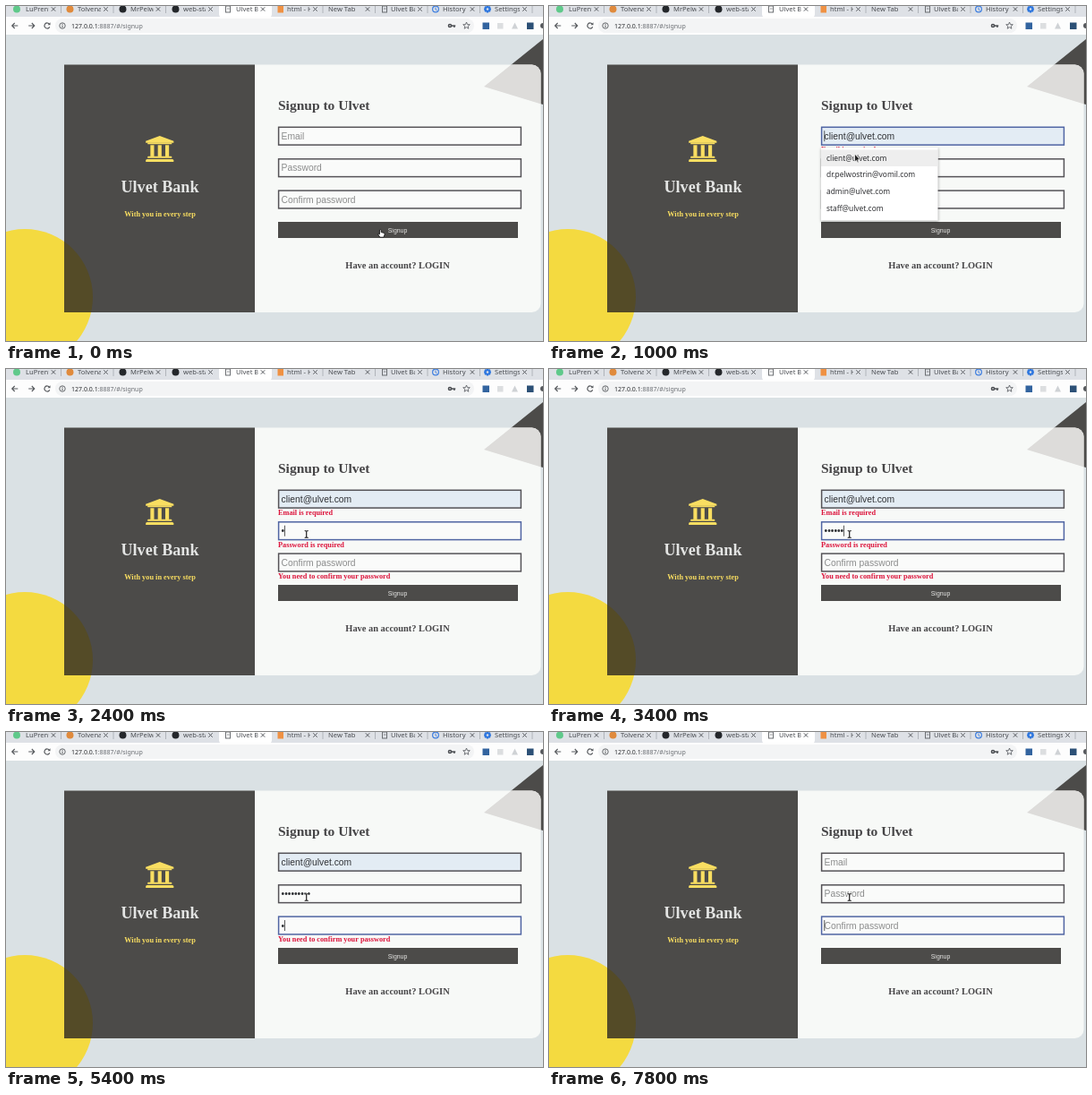
An HTML page with a canvas for the animation above (8000 ms loop, 600 by 374 pixels).

```html
<!DOCTYPE html>
<html lang="en">
<head>
<meta charset="utf-8">
<title>Signup form</title>
<style>
  html, body { margin: 0; width: 100%; height: 100%; overflow: hidden; background: #dae1e4; }
  canvas { display: block; width: 600px; height: 374px; }
</style>
</head>
<body>
<canvas id="stage"></canvas>
<script>
const W = 600, H = 374, LOOP = 8000, STEP = 200;
const SERIF = '"Liberation Serif", "Times New Roman", serif';
const SANS = '"Liberation Sans", Arial, sans-serif';
const UI = '"Noto Sans", "Open Sans", sans-serif';
const DARK = '#4c4b49', INK = '#464547', YELLOW = '#f9de61', RED = '#dc143c';

const canvas = document.getElementById('stage');
const c = canvas.getContext('2d');
const ratio = window.devicePixelRatio || 1;
canvas.width = W * ratio;
canvas.height = H * ratio;

function rect(x, y, w, h, fill) {
  c.fillStyle = fill;
  c.fillRect(x, y, w, h);
}

function round(x, y, w, h, radii, fill) {
  c.beginPath();
  c.roundRect(x, y, w, h, radii);
  c.fillStyle = fill;
  c.fill();
}

function disc(x, y, r, fill) {
  c.beginPath();
  c.arc(x, y, r, 0, Math.PI * 2);
  c.fillStyle = fill;
  c.fill();
}

function poly(points, fill) {
  c.beginPath();
  points.forEach(([x, y]) => c.lineTo(x, y));
  c.closePath();
  c.fillStyle = fill;
  c.fill();
}

function lines(color, width, ...paths) {
  c.strokeStyle = color;
  c.lineWidth = width;
  c.beginPath();
  for (const path of paths) {
    path.forEach(([x, y], i) => i ? c.lineTo(x, y) : c.moveTo(x, y));
  }
  c.stroke();
}

function text(str, x, y, font, fill, align = 'left') {
  c.font = font;
  c.fillStyle = fill;
  c.textAlign = align;
  c.fillText(str, x, y);
}

// Value of the last entry [time, value] already reached
function at(track, t) {
  let value = track[0][1];
  for (const [start, v] of track) if (t >= start) value = v;
  return value;
}

// --- Browser frame ---

function page(x) {
  c.strokeStyle = '#6b6e72';
  c.lineWidth = 1;
  c.strokeRect(x - 2.5, 0, 5, 7);
  lines('#6b6e72', 0.8, [[x - 1, 3], [x + 1.5, 3]]);
}

function clock(x) {
  c.beginPath();
  c.arc(x, 3.5, 3.4, 0, 7);
  c.strokeStyle = '#3f7fe0';
  c.lineWidth = 1.2;
  c.stroke();
  lines('#3f7fe0', 0.9, [[x, 1.5], [x, 4], [x + 1.6, 5]]);
}

function gear(x) {
  c.save();
  c.translate(x, 3.5);
  for (let i = 0; i < 4; i++) {
    rect(-1.1, -4, 2.2, 8, '#2f77df');
    c.rotate(Math.PI / 4);
  }
  c.restore();
  disc(x, 3.5, 3, '#2f77df');
  disc(x, 3.5, 1.2, '#dee1e6');
}

const tabs = [
  ['LuPrent', 22, () => disc(12, 3.5, 4, '#5fc98a')],
  ['Tolvena', 80, () => disc(71.5, 3.5, 4, '#e08a3c')],
  ['MrPelwo', 139, () => disc(130.5, 3.5, 4, '#24272b')],
  ['web-star', 198, () => disc(189.5, 3.5, 4, '#24272b')],
  ['Ulvet Bank', 257, () => page(248)],
  ['html - How', 314, () => rect(303.5, 0, 6.5, 7.5, '#ef9143')],
  ['New Tab', 360, null],
  ['Ulvet Bank', 430, () => page(423)],
  ['History', 488, () => clock(480)],
  ['Settings', 546, () => gear(538)]
];

function drawTabs() {
  rect(0, 0, W, 13, '#dee1e6');
  round(238, -8, 59, 22, 5, '#fff');
  tabs.forEach(([label, x, icon], i) => {
    const close = 53 + 58.5 * i;
    if (icon) icon();
    c.save();
    c.beginPath();
    c.rect(x, 0, close - 5.5 - x, 12);
    c.clip();
    text(label, x, 6.4, '7.6px ' + UI, '#484b50');
    c.restore();
    lines('#55585d', 1, [[close - 2.2, 1.3], [close + 2.2, 5.7]], [[close + 2.2, 1.3], [close - 2.2, 5.7]]);
    if (i !== 3 && i !== 4) lines('#a5a9af', 0.8, [[close + 8.5, 0], [close + 8.5, 8]]);
  });
}

function arrow(x, dir, color) {
  lines(color, 1.1, [[x - 3.3, 22], [x + 3.3, 22]],
    [[x + dir * 0.3, 19], [x + dir * 3.3, 22], [x + dir * 0.3, 25]]);
}

function star(x, y) {
  c.beginPath();
  for (let i = 0; i < 10; i++) {
    const a = i * Math.PI / 5 - Math.PI / 2, r = i % 2 ? 1.7 : 4;
    c.lineTo(x + r * Math.cos(a), y + r * Math.sin(a));
  }
  c.closePath();
  c.strokeStyle = '#5f6368';
  c.lineWidth = 0.9;
  c.stroke();
}

function drawBar(hasKey) {
  rect(0, 12, W, 20, '#fdfdfd');
  round(55, 14, 468, 16, 8, '#f3f4f5');
  arrow(10, -1, '#55585c');
  arrow(28.5, 1, '#55585c');
  c.strokeStyle = '#55585c';
  c.lineWidth = 1.1;
  c.beginPath();
  c.arc(46, 22, 3, 0.4, 5.5);
  c.stroke();
  poly([[46.6, 21.2], [49.5, 21.2], [49.5, 18.3]], '#55585c');

  c.lineWidth = 0.9;
  c.beginPath();
  c.arc(63, 22, 3.2, 0, 7);
  c.stroke();
  rect(62.5, 21.5, 1, 2.4, '#55585c');
  rect(62.5, 19.8, 1, 1, '#55585c');

  const host = '127.0.0.1', font = '7px ' + UI;
  text(host, 73, 24.7, font, '#2b2d30');
  text(':8887/#/signup', 73 + c.measureText(host).width, 24.7, font, '#6b6f74');

  if (hasKey) {
    disc(496, 22, 2.3, '#4a4d51');
    disc(496, 22, 0.8, '#f3f4f5');
    rect(498, 21.3, 4.2, 1.5, '#4a4d51');
    rect(500.2, 22, 1.4, 2, '#4a4d51');
  }
  star(514.5, 22);

  rect(532.5, 18.5, 7.5, 7.5, '#33649f');
  rect(549, 19, 6.5, 6.5, '#dcdee0');
  poly([[565, 25.5], [568.5, 18.5], [572, 25.5]], '#cfd2d5');
  rect(582, 18.5, 7.5, 7.5, '#2c5076');
  disc(600, 22, 3, '#55585c');
}

// --- Page ---

function bankIcon() {
  c.save();
  c.translate(155.1, 142.8);
  c.scale(0.065, 0.065);
  poly([[16, 122], [256, 34], [496, 122], [496, 152], [16, 152]], YELLOW);
  rect(48, 150, 416, 26, YELLOW);
  for (const x of [96, 224, 352]) rect(x, 192, 64, 195, YELLOW);
  round(48, 384, 416, 32, [12, 12, 0, 0], YELLOW);
  round(16, 432, 480, 48, [24, 24, 8, 8], YELLOW);
  c.restore();
}

function drawPage() {
  const wedge = [[534, 90], [600, 37], [600, 110]];
  rect(0, 32, W, H - 32, '#dae1e4');
  disc(21, 325, 76, '#f4da40');
  poly(wedge, DARK);

  c.save();
  c.beginPath();
  c.roundRect(65, 65.5, 532.5, 276.5, [0, 10, 10, 0]);
  c.clip();
  rect(278, 65, 320, 278, '#f7f9f7');
  poly(wedge, '#dddcda');
  rect(65, 65, 213, 278, DARK);
  c.beginPath();
  c.rect(65, 65, 213, 278);
  c.clip();
  disc(21, 325, 76, '#544b27');
  c.restore();

  bankIcon();
  text('Ulvet Bank', 172, 207.5, 'bold 18.1px ' + SERIF, '#e3e4e3', 'center');
  text('With you in every step', 172, 234.7, 'bold 8.3px ' + SERIF, YELLOW, 'center');
  text('Signup to Ulvet', 304, 115.7, 'bold 15.5px ' + SERIF, INK);
  text('Have an account? LOGIN', 437.5, 292.8, 'bold 10.4px ' + SERIF, INK, 'center');
  rect(304, 241, 268, 18, DARK);
  text('Signup', 437.5, 252.6, '6.9px ' + SANS, '#e8e8e6', 'center');
}

function field(y, hint, value, focused, fill, caretAtStart) {
  rect(304, y, 272, 21, fill);
  c.strokeStyle = focused ? '#5065a3' : '#555357';
  c.lineWidth = 1.5;
  c.strokeRect(304.6, y + 0.6, 270.8, 19.8);
  text(value || hint, 307.6, y + 14.2, '10.3px ' + SANS, value ? '#303236' : '#8b8c8c');
  if (focused) {
    const w = value && !caretAtStart ? c.measureText(value).width : 0;
    rect(307.4 + w, y + 4.5, 0.8, 12, '#333');
  }
}

const choices = ['client@ulvet.com', 'dr.pelwostrin@vomil.com', 'admin@ulvet.com', 'staff@ulvet.com'];

function dropdown(hovered) {
  c.save();
  c.shadowColor = 'rgba(0,0,0,.3)';
  c.shadowBlur = 3 * ratio;
  c.shadowOffsetY = ratio;
  rect(304, 158, 130.5, 81.5, '#fff');
  c.restore();
  if (hovered) rect(304, 160.5, 130.5, 18.5, '#eeeeee');
  choices.forEach((s, i) => text(s, 310, 172.8 + 18.6 * i, '500 8.4px ' + UI, '#2f3033'));
}

// --- Pointer ---

const pointers = {
  hand() {
    c.beginPath();
    c.moveTo(-1.6, -4);
    c.quadraticCurveTo(-0.7, -5, 0.2, -4);
    c.lineTo(0.2, -1.4);
    c.lineTo(3.4, -0.7);
    c.quadraticCurveTo(4.4, -0.3, 4, 1.4);
    c.lineTo(3, 4.2);
    c.lineTo(-1.2, 4.2);
    c.lineTo(-3.6, 0.6);
    c.quadraticCurveTo(-3.2, -0.5, -1.6, 0.8);
    c.closePath();
    c.fillStyle = '#fff';
    c.fill();
    c.strokeStyle = '#111';
    c.lineWidth = 0.9;
    c.stroke();
  },
  beam() {
    const shape = [[[-2, -4], [0, -3.4], [2, -4]], [[0, -3.4], [0, 3.4]], [[-2, 4], [0, 3.4], [2, 4]]];
    lines('rgba(255,255,255,.8)', 2.4, ...shape);
    lines('#222', 1.2, ...shape);
  },
  arrow() {
    const shape = [[0, 0], [0, 9], [2, 7.2], [3.3, 10], [4.6, 9.4], [3.4, 6.7], [6, 6.5]];
    poly(shape, '#222');
    lines('#fff', 0.7, [...shape, shape[0]]);
  }
};

const pointer = [
  [0, ['hand', 419, 254]],
  [400, ['hand', 412, 250]],
  [600, ['beam', 350, 150]],
  [800, ['beam', 345, 149]],
  [1000, ['arrow', 341.5, 165]],
  [1400, ['beam', 337, 184]],
  [2200, ['beam', 335.7, 184.5]]
];

// --- Script of the session ---

const focus = [[0, ''], [600, 'email'], [1400, 'pass'], [4000, 'confirm']];
const passLength = [[0, 0], [2400, 1], [2600, 2], [2800, 3], [3000, 4], [3400, 6], [3600, 9]];
const dots = n => '•'.repeat(n);

function draw(t) {
  const cleared = t >= 7600;
  const active = at(focus, t);
  const picked = t >= 1000 && !cleared;
  const confirmCount = Math.max(0, Math.min(9, (t - 5200) / STEP));

  c.setTransform(ratio, 0, 0, ratio, 0, 0);
  drawTabs();
  drawBar(t < 1200 || t >= 2400);
  drawPage();

  const plain = '#fafbfa';
  field(134.7, 'Email', picked ? choices[0] : '', active === 'email', picked ? '#e3ecf4' : plain, t < 1200);
  field(170.2, 'Password', cleared ? '' : dots(at(passLength, t)), active === 'pass', plain);
  field(205.5, 'Confirm password', cleared ? '' : dots(confirmCount), active === 'confirm', plain);

  const errFont = 'bold 8.25px ' + SERIF;
  if (t >= 200 && t < 4000) {
    text('Email is required', 304, 163, errFont, RED);
    text('Password is required', 304, 198.7, errFont, RED);
  }
  if (t >= 200 && !cleared) text('You need to confirm your password', 304, 234, errFont, RED);

  if (t >= 800 && t < 1200) dropdown(t >= 1000);

  const [kind, x, y] = at(pointer, t);
  c.save();
  c.translate(x, y);
  pointers[kind]();
  c.restore();
}

function tick() {
  const t = performance.now() % LOOP;
  draw(Math.floor(t / STEP) * STEP);
  requestAnimationFrame(tick);
}
tick();
</script>
</body>
</html>
```
